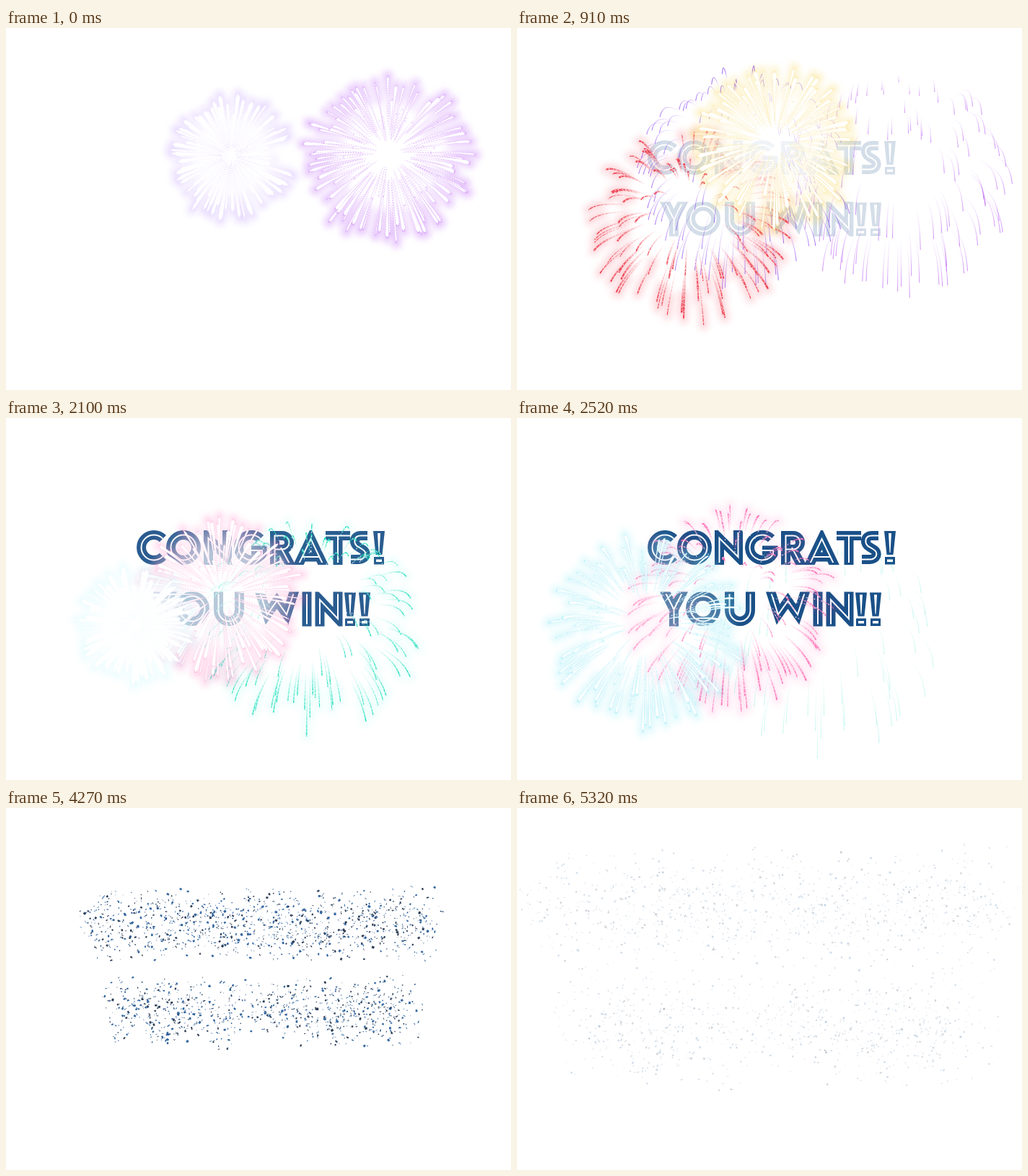
Animation, 700 px wide and 503 px high, one loop 5.39 s. Source, as an HTML page with a canvas:

```html
<!DOCTYPE html>
<html lang="en">
<head>
<meta charset="utf-8">
<title>Congrats! You win!!</title>
<style>
html, body { margin: 0; width: 100%; height: 100%; overflow: hidden; background: #fff; }
canvas { display: block; width: 700px; height: 503px; }
</style>
</head>
<body>
<canvas id="stage" width="700" height="503" role="img" aria-label="CONGRATS! YOU WIN!!">CONGRATS! YOU WIN!!</canvas>
<script>
const W = 700, H = 503, LOOP = 5390, STEP = 70, NAVY = '#1a5088';
const ctx = document.getElementById('stage').getContext('2d');
const clamp = (v, a = 0, b = 1) => Math.min(b, Math.max(a, v));

function seeded(s) {
  return () => {
    s = (s + 0x6D2B79F5) | 0;
    let v = Math.imul(s ^ (s >>> 15), 1 | s);
    v = (v + Math.imul(v ^ (v >>> 7), 61 | v)) ^ v;
    return ((v ^ (v >>> 14)) >>> 0) / 4294967296;
  };
}

// Lettering: each glyph is a centre line, stroked thick in navy with a white inline.
const ring = (x, y) => `M${x - 17.5} ${y}a17.5 17.5 0 1 0 35 0a17.5 17.5 0 1 0-35 0Z`;
const rows = [
  { top: 156, base: 204, bangs: [517], glyphs: [
    'M217.4 167.6A17.5 17.5 0 1 0 217.4 192.4',
    ring(246, 180),
    'M280.5 206V167L306.5 193V154',
    'M352.5 167.6A17.5 17.5 0 1 0 355 189V184H340',
    'M372.5 206V163.5H383a9.5 9.5 0 0 1 0 19H372.5M381 180L396 208',
    'M402.5 210L422.5 168L442.5 210M411 193H434',
    'M443 163.5H477M460 163.5V206',
    'M501 163.5H492c-11 0-11 12-3 16l5 3c8 5 4 14-5 14H478'
  ] },
  { top: 241.5, base: 289.5, bangs: [477, 497], glyphs: [
    'M203 237L217.5 266V292M232 237L217.5 266',
    ring(258, 265),
    'M294.5 238V267a14.5 15.5 0 0 0 29 0V238',
    'M350 236L362 273L375.5 254L389 273L401 236',
    'M417 238V292',
    'M435 292V252.5L460 279V238'
  ] }
];

function makeText() {
  const c = document.createElement('canvas');
  c.width = W; c.height = H;
  const g = c.getContext('2d', { willReadFrequently: true });
  const strokeRow = (row, inset, width, color) => {
    g.save();
    g.beginPath();
    g.rect(0, row.top + inset, W, row.base - row.top - 2 * inset);
    g.clip();
    g.lineWidth = width;
    g.strokeStyle = color;
    row.glyphs.forEach(d => g.stroke(new Path2D(d)));
    g.restore();
  };
  for (const row of rows) {
    strokeRow(row, 0, 13, NAVY);
    strokeRow(row, 3, 2, '#fff');
    for (const x of row.bangs) {
      const t = row.top + 1, b = row.base - .5;
      g.fillStyle = NAVY;
      g.fill(new Path2D(`M${x - 8} ${t}h16l-3.5 33h-9Z`));
      g.fillRect(x - 7, b - 10.5, 14, 10.5);
      g.fillStyle = '#fff';
      g.fill(new Path2D(`M${x - 2} ${t + 3}h4l-1.5 27h-1Z`));
      g.fillRect(x - 4, b - 7, 8, 3.5);
    }
  }
  return c;
}
const text = makeText();

function makeShards() {
  const px = text.getContext('2d').getImageData(0, 0, W, H).data;
  const rnd = seeded(41), list = [], gap = 2.6;
  for (let y = 155; y < 291; y += gap) for (let x = 180; x < 528; x += gap) {
    const i = ((y | 0) * W + (x | 0)) * 4;
    if (px[i + 3] < 120 || px[i] > 110) continue;
    const a = rnd() * 6.283, d = Math.sqrt(rnd());
    list.push({
      x, y, dx: Math.cos(a) * d * 58, dy: Math.sin(a) * d * 55,
      size: .5 + .8 * rnd() ** 2, turn: rnd() * 6.3, spin: (rnd() - .5) * 14,
      flip: rnd() * 6.3, color: rnd() < .4 ? '#26374f' : '#2c609c'
    });
  }
  return list;
}
const shards = makeShards();

function drawShards(ms) {
  const p = 1 - Math.exp(-ms / 700), s = ms / 1000;
  const size = 1.45 + 3 * Math.exp(-ms / 130);
  ctx.globalAlpha = clamp(1 - (ms - 300) / 1400, .2, 1);
  for (const q of shards) {
    const k = size * q.size;
    const w = k * (.25 + .75 * Math.cos(q.flip + s * 5) ** 2);
    ctx.save();
    ctx.translate(q.x + p * (.92 * (q.x - 353) + q.dx), q.y + p * (1.15 * (q.y - 222) + q.dy));
    ctx.rotate(q.turn + q.spin * s);
    ctx.fillStyle = q.color;
    ctx.beginPath();
    ctx.moveTo(-w, -k * .6);
    ctx.lineTo(w * .5, -k);
    ctx.lineTo(w, k * .6);
    ctx.lineTo(-w * .4, k);
    ctx.fill();
    ctx.restore();
  }
  ctx.globalAlpha = 1;
}

// x, y, full radius, birth, life, rgb
const bursts = [
  [312, 178, 158, -290, 1850, '125,50,240'],
  [530, 175, 158, -500, 2050, '165,45,240'],
  [240, 256, 154, 72, 1850, '236,45,62'],
  [358, 160, 158, 444, 1700, '245,197,24'],
  [421, 268, 160, 1074, 1750, '16,220,184'],
  [298, 246, 158, 1634, 1580, '255,105,178'],
  [180, 287, 160, 1849, 1370, '125,228,244']
].map(([x, y, R, birth, life, rgb], n) => {
  const rnd = seeded(n * 97 + 5), count = 115, rays = [];
  for (let i = 0; i < count; i++) rays.push({
    a: (i + rnd() * 3.5) / count * 6.2832,
    len: rnd() < .5 ? .82 + rnd() * .2 : .42 + rnd() * .45,
    w: .8 + 2.6 * rnd(),
    die: .72 + rnd() * .28
  });
  return { x, y, R, birth, life, rgb, rays };
});

const SEG = 10;
function trail(b, ray, age) {
  const from = age * clamp(age / 2400, .12, .38), pts = [];
  for (let i = 0; i <= SEG; i++) {
    const t = from + (age - from) * i / SEG;
    const r = b.R * ray.len * (1 - Math.exp(-t / 350));
    pts.push([b.x + Math.cos(ray.a) * r, b.y + Math.sin(ray.a) * r + 24 * (t / 1000) ** 2]);
  }
  return pts;
}

function line(path, pts, first = 0) {
  path.moveTo(...pts[first]);
  for (let i = first + 1; i < pts.length; i++) path.lineTo(...pts[i]);
}

function wedge(pts, w) {
  const [x0, y0] = pts[0], [x1, y1] = pts[SEG];
  const d = Math.hypot(x1 - x0, y1 - y0) || 1, nx = (y0 - y1) / d, ny = (x1 - x0) / d;
  const path = new Path2D(), half = i => i === SEG ? .2 : w * Math.pow(i / (SEG - 1), .8);
  for (let i = 0; i <= SEG; i++) path.lineTo(pts[i][0] + nx * half(i), pts[i][1] + ny * half(i));
  for (let i = SEG; i >= 0; i--) path.lineTo(pts[i][0] - nx * half(i), pts[i][1] - ny * half(i));
  path.closePath();
  return path;
}

function drawBurst(b, now) {
  const age = now - b.birth;
  if (age <= 0 || age >= b.life) return;
  const rgba = a => `rgba(${b.rgb},${a})`;
  const live = b.rays.filter(r => age < b.life * r.die).map(r => [r, trail(b, r, age)]);

  const glow = clamp(age / 500) * clamp((1150 - age) / 500);
  if (glow > 0) {
    const path = new Path2D();
    live.forEach(([ray, pts]) => ray.len > .6 && line(path, pts, 5));
    ctx.save();
    ctx.lineCap = ctx.lineJoin = 'round';
    ctx.filter = 'blur(3px)';
    ctx.strokeStyle = rgba(.1 * glow);
    ctx.lineWidth = 20;
    ctx.stroke(path);
    ctx.strokeStyle = rgba(.2 * glow);
    ctx.lineWidth = 7;
    ctx.stroke(path);
    ctx.restore();
  }

  const core = clamp(1.5 - age / 560);
  if (core > 0) {
    const r = b.R * (1 - Math.exp(-age / 350)) * .95;
    const g = ctx.createRadialGradient(b.x, b.y, 0, b.x, b.y, r);
    g.addColorStop(0, `rgba(255,255,255,${core})`);
    g.addColorStop(.55, `rgba(255,255,255,${core * .95})`);
    g.addColorStop(1, 'rgba(255,255,255,0)');
    ctx.fillStyle = g;
    ctx.beginPath();
    ctx.arc(b.x, b.y, r, 0, 7);
    ctx.fill();
  }

  const ink = clamp((age - 250) / 500), fat = clamp(1.35 - age / 900);
  const fade = clamp((b.life - age) / 650);
  ctx.save();
  ctx.lineJoin = 'round';
  for (const [ray, pts] of live) {
    const path = new Path2D();
    line(path, pts);
    if (ink > .4) {
      const g = ctx.createLinearGradient(...pts[0], ...pts[SEG]);
      g.addColorStop(0, rgba(0));
      g.addColorStop(.5, rgba(.3 * ink * fade));
      g.addColorStop(1, rgba(.95 * ink * fade));
      ctx.strokeStyle = g;
      ctx.setLineDash([]);
      ctx.lineWidth = .6 + ray.w * .8 * clamp((1250 - age) / 600);
      ctx.stroke(path);
    }
    if (fat > 0 && ink < .9) {
      const shape = wedge(pts, ray.w * fat);
      ctx.fillStyle = '#fff';
      ctx.fill(shape);
      ctx.setLineDash([1, 2.5]);
      ctx.lineWidth = .6;
      ctx.strokeStyle = rgba(.08 + .6 * ink);
      ctx.stroke(shape);
    }
    if (ink > .6 && age < 1150) {
      ctx.setLineDash([1.5, 3, 1, 5]);
      ctx.lineWidth = 1.2;
      ctx.strokeStyle = 'rgba(255,255,255,.85)';
      ctx.stroke(path);
    }
  }
  ctx.restore();
}

function draw(t) {
  ctx.fillStyle = '#fff';
  ctx.fillRect(0, 0, W, H);
  if (t >= 3990) return drawShards(t - 3920);
  ctx.globalAlpha = clamp((t - 620) / 1600);
  ctx.drawImage(text, 0, 0);
  ctx.globalAlpha = 1;
  if (t < 3220) bursts.forEach(b => drawBurst(b, t));
}

const start = performance.now();
let shown = -1;
function tick() {
  const t = Math.floor((performance.now() - start) % LOOP / STEP) * STEP;
  if (t !== shown) draw(shown = t);
  requestAnimationFrame(tick);
}
tick();
</script>
</body>
</html>
```
